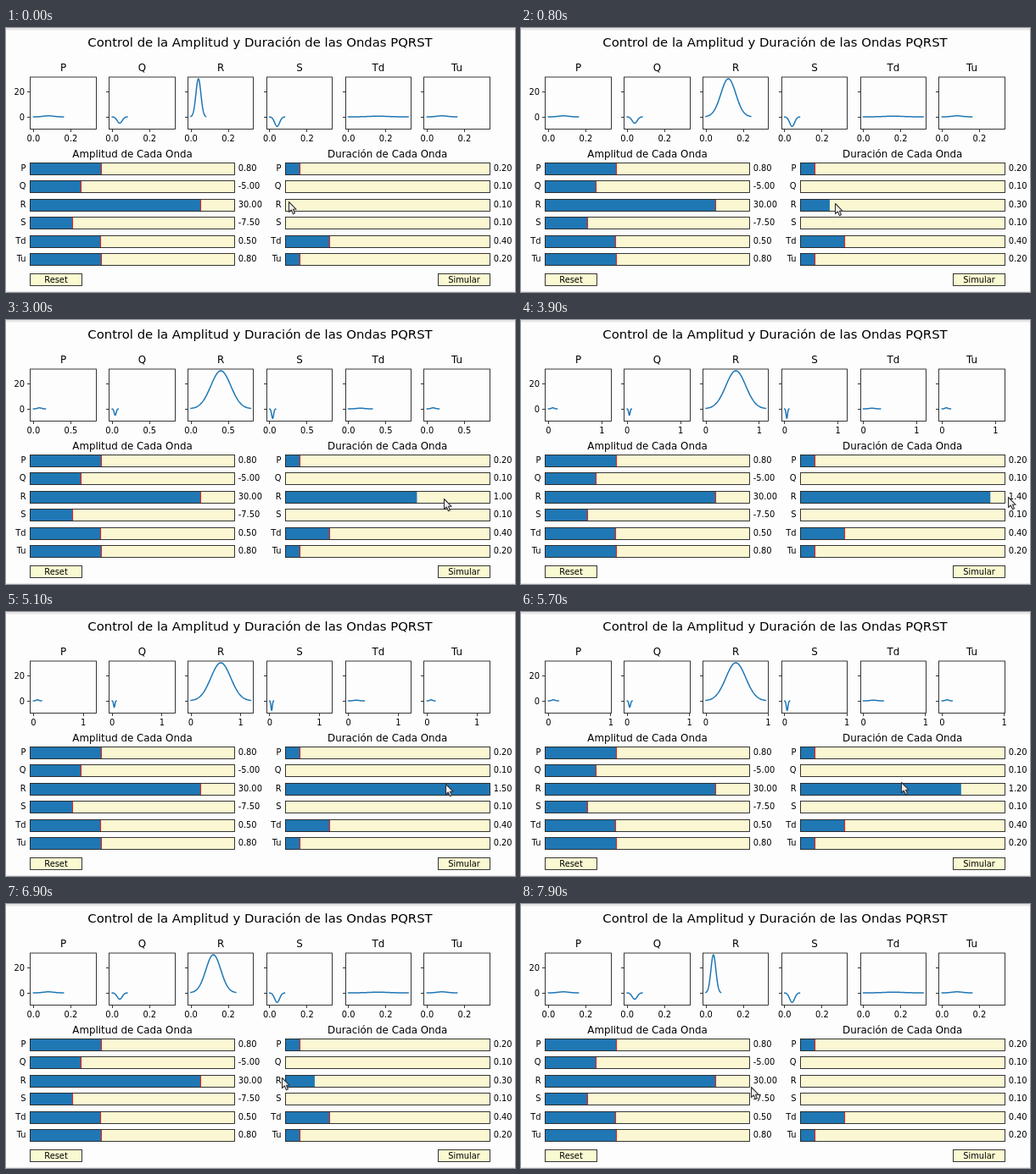
An HTML page for the animation above (8000 ms loop, 600x312 px).

```html
<!DOCTYPE html>
<html lang="es">
<head>
<meta charset="utf-8">
<title>Ondas PQRST</title>
<style>
  html, body { margin: 0; width: 100%; height: 100%; overflow: hidden; background: #fdfdfd; }
  svg { display: block; width: 600px; height: 312px; }
  text { font-family: "DejaVu Sans", sans-serif; font-size: 9.87px; fill: #000; white-space: pre; }
  .head { font-size: 14.84px; }
  .sub { font-size: 11.85px; }
  .mid { text-anchor: middle; }
  .end { text-anchor: end; }
  .box { fill: none; stroke: #222; stroke-width: 0.9; }
  .tick { stroke: #222; stroke-width: 0.9; }
  .edge { fill: #e8e5e5; }
  .button { fill: #fafad2; }
  .track { fill: #faf7d2; }
  .fill { fill: #1f77b4; }
  .mark { stroke: #e8201c; stroke-width: 1.1; }
  .wave { fill: none; stroke: #1f77b4; stroke-width: 1.5; stroke-linecap: square; stroke-linejoin: round; }
  .cursor { fill: #eee; stroke: #333; stroke-width: 1.1; stroke-linejoin: round; }
</style>
</head>
<body>
<svg id="stage" viewBox="0 0 600 312"></svg>
<script>
const LOOP = 8000, STEP = 100;
const stage = document.getElementById('stage');

// name, amplitude, amplitude slider fraction, duration
const waves = [
  ['P', 0.8, 0.347, 0.2],
  ['Q', -5, 0.25, 0.1],
  ['R', 30, 0.834, 0.1],
  ['S', -7.5, 0.209, 0.1],
  ['Td', 0.5, 0.344, 0.4],
  ['Tu', 0.8, 0.347, 0.2]
].map(([name, amp, ampPos, dur]) => ({ name, amp, ampPos, dur }));

// time, duration of R
const durKeys = [[0, 0.1], [800, 0.3], [1900, 0.7], [3000, 1], [4200, 1.5],
                 [5100, 1.5], [6300, 0.8], [7200, 0.1], [8000, 0.1]];
// time, pointer x, pointer y
const pointerKeys = [[0, 333, 205], [800, 370, 207], [1900, 436, 206], [3000, 516, 211],
                     [3900, 574, 209], [4500, 573, 206], [5100, 518, 203], [6300, 379, 199],
                     [6800, 331, 204], [7900, 271, 216], [8000, 271, 216]];

function add(tag, attrs, label) {
  const el = document.createElementNS('http://www.w3.org/2000/svg', tag);
  for (const key in attrs) el.setAttribute(key, attrs[key]);
  if (label !== undefined) el.textContent = label;
  return stage.appendChild(el);
}
const text = (x, y, label, cls = '') => add('text', { x, y, class: cls }, label);
const rect = (x, y, width, height, cls) => add('rect', { x, y, width, height, class: cls });
const line = (x1, y1, x2, y2, cls) => add('line', { x1, y1, x2, y2, class: cls });
const snap = v => Math.floor(v) + 0.5;

function tween(keys, t) {
  let i = 1;
  while (i < keys.length - 1 && t > keys[i][0]) i++;
  const a = keys[i - 1], b = keys[i];
  const k = (t - a[0]) / (b[0] - a[0]);
  return a.slice(1).map((v, j) => v + (b[j + 1] - v) * k);
}

const LEFT = 28.9, PLOT_W = 77.5, PITCH = 92.79;
const TOP = 58, BOTTOM = 119.5, ZERO = 105, UNIT = 1.5;
const BAR_W = 241, BAR_H = 14, MIN = 0.1, MAX = 1.5;
const durWidth = d => BAR_W * (d - MIN) / (MAX - MIN);

rect(0, 0, 600, 2.5, 'edge');
rect(0, 311, 600, 1, 'edge');
text(299.5, 21.6, 'Control de la Amplitud y Duración de las Ondas PQRST', 'head mid');
text(149, 153.3, 'Amplitud de Cada Onda', 'sub mid');
text(449.7, 153.3, 'Duración de Cada Onda', 'sub mid');
text(22, 79, '20', 'end');
text(22, 108.7, '0', 'end');

const plots = waves.map((wave, i) => {
  const x = LEFT + i * PITCH, left = snap(x), right = snap(x + PLOT_W);
  text(x + PLOT_W / 2, 51.4, wave.name, 'sub mid');
  for (const y of [75.5, 105.5]) line(left - 3.5, y, left, y, 'tick');
  const ticks = [0, 1].map(() => ({
    mark: line(0, BOTTOM, 0, BOTTOM + 3.5, 'tick'),
    label: text(0, 133.8, '', 'mid')
  }));
  const path = add('path', { class: 'wave' });
  rect(left, TOP, right - left, BOTTOM - TOP, 'box');
  return { wave, x, ticks, path };
});

function slider(x, y, width, marked, name, value) {
  const end = snap(x + width);
  rect(x, y, BAR_W, BAR_H, 'track');
  const fill = rect(x, y, width, BAR_H, 'fill');
  if (marked) line(end, y, end, y + BAR_H, 'mark');
  rect(x, y, BAR_W, BAR_H, 'box');
  text(x - 5, y + 9.6, name, 'end');
  return { fill, label: text(x + BAR_W + 4.2, y + 9.6, value.toFixed(2)) };
}

let active;
waves.forEach((w, i) => {
  const y = snap(159.2 + i * 21.5);
  slider(28.5, y, BAR_W * w.ampPos, true, w.name, w.amp);
  const s = slider(329.5, y, durWidth(w.dur), w.dur > MIN, w.name, w.dur);
  if (w.name === 'R') active = s;
});

for (const [x, label] of [[28.5, 'Reset'], [509.5, 'Simular']]) {
  rect(x, 290.5, 61, 14, 'button');
  rect(x, 290.5, 61, 14, 'box');
  text(x + 30.5, 300.9, label, 'mid');
}

const cursor = add('path', {
  class: 'cursor',
  d: 'M0 0V12L2.8 9.5L5 14.2L7 13.3L5 8.8H8.7Z'
});

// Bell curve spanning the wave's length, three deviations to each side
function bell(x0, width, amp) {
  const n = 60, points = [];
  for (let i = 0; i <= n; i++) {
    const u = i / n, z = (u - 0.5) * 6;
    const y = ZERO - UNIT * amp * Math.exp(-z * z / 2);
    points.push((x0 + u * width).toFixed(2) + ' ' + y.toFixed(2));
  }
  return 'M' + points.join('L');
}

function drawPlots(dur) {
  const span = Math.max(0.32, 0.8 * dur);
  const step = [0.2, 0.25, 0.5, 1].find(s => s >= 0.55 * span);
  const digits = step === 1 ? 0 : step === 0.25 ? 2 : 1;
  const scale = PLOT_W / 1.1 / span;
  for (const { wave, x, ticks, path } of plots) {
    const x0 = x + PLOT_W * 0.05 / 1.1;
    const length = 0.8 * (wave.name === 'R' ? dur : wave.dur);
    path.setAttribute('d', bell(x0, length * scale, wave.amp));
    ticks.forEach(({ mark, label }, i) => {
      const tx = x0 + i * step * scale;
      mark.setAttribute('x1', snap(tx));
      mark.setAttribute('x2', snap(tx));
      label.setAttribute('x', tx);
      label.textContent = (i * step).toFixed(digits);
    });
  }
}

let shown;
function render(time) {
  const t = Math.floor((time % LOOP) / STEP) * STEP;
  const dur = Math.round(tween(durKeys, t)[0] * 10 + 1e-6) / 10;
  if (dur !== shown) {
    shown = dur;
    drawPlots(dur);
    active.fill.setAttribute('width', durWidth(dur));
    active.label.textContent = dur.toFixed(2);
  }
  const [x, y] = tween(pointerKeys, t);
  cursor.setAttribute('transform', `translate(${snap(x)} ${snap(y)})`);
}

const start = performance.now();
function loop() {
  render(performance.now() - start);
  requestAnimationFrame(loop);
}
loop();
</script>
</body>
</html>
```
